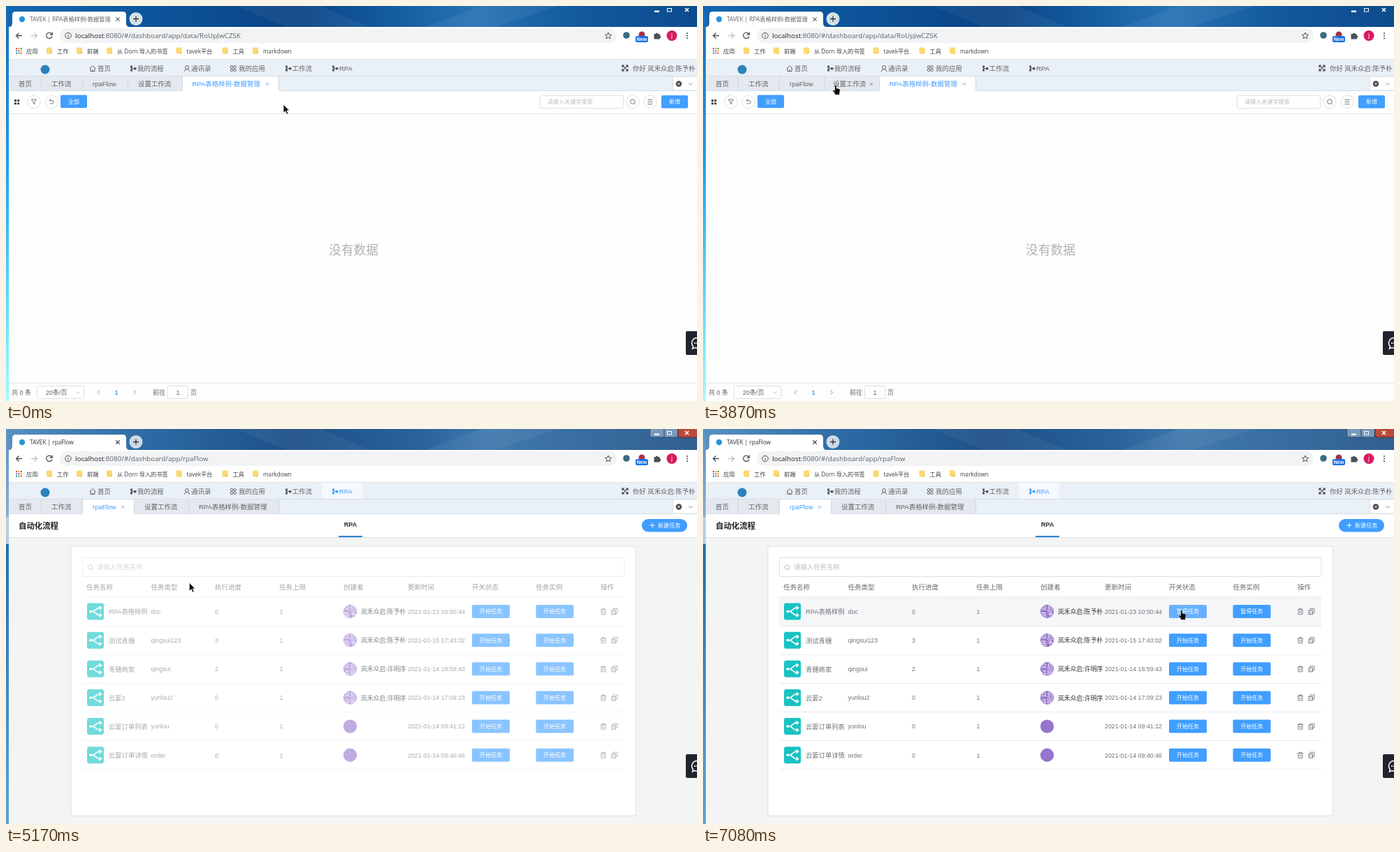
Recreate the animation shown at these times as an HTML page. Size 989x566 px, loop 8000 ms.

```html
<!DOCTYPE html>
<html lang="zh-CN">
<head>
<meta charset="utf-8">
<title>Task console</title>
<style>
html, body { margin: 0; width: 100%; height: 100%; overflow: hidden; background: #fff; }
svg { display: block; font-family: "Liberation Sans", "Noto Sans CJK SC", sans-serif; }
.ui { font-family: "Open Sans", "Noto Sans CJK SC", sans-serif; }
.b { font-weight: bold; }
.mid { text-anchor: middle; }
</style>
</head>
<body>
<svg width="989" height="566" viewBox="0 0 989 566">
  <defs>
    <linearGradient id="sky">
      <stop offset="0" stop-color="#1567b0"/><stop offset=".2" stop-color="#0d559c"/>
      <stop offset=".42" stop-color="#0b4384"/><stop offset=".55" stop-color="#135a9f"/>
      <stop offset=".68" stop-color="#2873b4"/><stop offset=".82" stop-color="#135a9f"/>
      <stop offset="1" stop-color="#0d4b8d"/>
    </linearGradient>
    <linearGradient id="glass">
      <stop offset="0" stop-color="#5a90c0"/><stop offset=".2" stop-color="#2d6ba5"/>
      <stop offset=".42" stop-color="#1d4f87"/><stop offset=".6" stop-color="#2a639c"/>
      <stop offset=".7" stop-color="#4079ad"/><stop offset="1" stop-color="#315f90"/>
    </linearGradient>
    <linearGradient id="strip" x2="0" y2="1">
      <stop offset="0" stop-color="#1468b4"/><stop offset=".4" stop-color="#1f9df0"/>
      <stop offset=".75" stop-color="#5fdcfb"/><stop offset="1" stop-color="#a5fbfb"/>
    </linearGradient>
    <linearGradient id="strip2" x2="0" y2="1">
      <stop offset="0" stop-color="#5a90c0"/><stop offset=".22" stop-color="#86b0d2"/>
      <stop offset=".225" stop-color="#b8cfe2"/><stop offset=".29" stop-color="#b8cfe2"/>
      <stop offset=".292" stop-color="#1f6fae"/><stop offset="1" stop-color="#5ba3d3"/>
    </linearGradient>
    <clipPath id="disc"><circle r="9.7"/></clipPath>
  </defs>
  <g id="scene"></g>
  <rect id="mask" x="109" y="184" width="777" height="305" fill="#fff"/>
  <g id="cursor"></g>
</svg>
<script>
const $ = id => document.getElementById(id);
const BLUE = '#409eff', GREY = '#606266', LINE = '#dcdfe6';

// Drawing helpers: text is placed by its vertical centre
const T = (x, y, s, size = 9.45, fill = GREY, cls = '') =>
  `<text x="${x}" y="${y + size * .37}" font-size="${size}" fill="${fill}" class="${cls}">${s}</text>`;
const R = (x, y, w, h, fill, r = 0, stroke = 'none') =>
  `<rect x="${x}" y="${y}" width="${w}" height="${h}" rx="${r}" fill="${fill}" stroke="${stroke}"/>`;
const C = (x, y, r, fill, stroke = 'none') =>
  `<circle cx="${x}" cy="${y}" r="${r}" fill="${fill}" stroke="${stroke}"/>`;
const P = (d, stroke = GREY, w = 1, fill = 'none') =>
  `<path d="${d}" stroke="${stroke}" stroke-width="${w}" fill="${fill}"/>`;
const at = (x, y, s) => `<g transform="translate(${x} ${y})">${s}</g>`;
const cross = (x, y, r, c, w = 1) => P(`M${x-r} ${y-r}l${2*r} ${2*r}m0 ${-2*r}l${-2*r} ${2*r}`, c, w);
const button = (x, y, w, h, s, fill = BLUE, r = 2) =>
  R(x, y, w, h, fill, r) + T(x + w / 2, y + h / 2, s, 8.1, '#fff', 'mid');
const magnifier = (x, y, c) => C(x, y, 3.3, 'none', c) + P(`M${x+2.4} ${y+2.4}l1.4 1.4`, c);

const company = '岚禾众启', owner = company + ':陈予朴', partner = company + ':许明序';
const form = 'RPA表格样例', formTab = form + '-数据管理';
const rows = [
  [form, 'doc', 0, owner, '23 10:50:44'],
  ['测试青穗', 'qingsui123', 3, owner, '15 17:43:02'],
  ['青穗商家', 'qingsui', 2, partner, '14 18:59:43'],
  ['云篓2', 'yunlou2', 0, partner, '14 17:09:23'],
  ['云篓订单列表', 'yunlou', 0, '', '14 09:41:12'],
  ['云篓订单详情', 'order', 0, '', '14 09:40:46'],
];

function chrome(page, focus) {
  const ink = focus ? '#303236' : '#5f6368', tool = '#4d5156';
  let s = R(0, 0, 989, 32, focus ? 'url(#glass)' : 'url(#sky)')
    + P('M330 0L400 30H520L450 0ZM600 30L680 0H790L700 30Z', 'none', 0, '#ffffff0d')
    + R(0, 0, 4, 566, focus ? 'url(#strip2)' : 'url(#strip)');
  if (focus) s += R(921.5, -4, 40, 16, '#7899bb', 3, '#27496d') + R(962, -4, 30, 16, '#bb4a3c', 3, '#5c2a2c')
    + P('M942 0V12', '#27496d');
  s += R(928, 6.5, 7, 2.5, '#fff') + R(946.5, 3.5, 6, 4.5, 'none', 0, '#fff') + cross(974.5, 5.5, 2.5, '#fff', 1.6)
    + P('M4 30Q9 30 9 24V13Q9 8 14 8H167Q172 8 172 13V24Q172 30 177 30Z', 'none', 0, '#fff')
    + C(23, 19, 4.2, '#2795dc')
    + T(34, 19, 'TAVEK | ' + (page ? 'rpaFlow' : formTab), 8.25, ink, 'ui')
    + cross(160, 19, 2.7, ink, 1.2) + C(186, 18.5, 9.5, focus ? '#cddbe6' : '#d3e1e5') + P('M182 18.5h8m-4-4v8', '#303236', 1.3)
    + R(4, 30, 985, 47, '#fff') + R(77, 32, 797, 21, '#f1f3f4', 10.5)
    + P('M23 42.5H14.5M18.5 38.5l-4 4 4 4', tool, 1.3) + P('M36 42.5H44.5M40.5 38.5l4 4-4 4', '#c0c2c5', 1.3)
    + P('M65.5 40A4.2 4.2 0 1 0 66 43.5M66.3 37.5V41H62.8', tool, 1.3)
    + C(89, 42.5, 4.2, 'none', tool) + P('M89 41.8v3m0-5v1', tool)
    + T(99, 42.3, `<tspan fill="#202124">localhost</tspan>:8080/#/dashboard/app/${page ? 'rpaFlow' : 'data/RoUpJwCZSK'}`, 9.83, '#5f6368', 'ui')
    + P('M862 38l1.3 3 3.2.3-2.4 2.2.7 3.2-2.8-1.7-2.8 1.7.7-3.2-2.4-2.2 3.2-.3Z', tool)
    + C(888, 42, 4.8, '#3b6b80') + C(910, 41, 4.5, '#a93242') + R(901, 43, 18, 9, '#1a73e8', 2)
    + T(910, 47.3, 'New', 7, '#fff', 'mid b')
    + P('M927.5 40h2.5a1.6 1.6 0 1 1 3.2 0h2.6v2.6a1.6 1.6 0 1 1 0 3.2v1.7h-8.3Z', 'none', 0, tool)
    + C(953, 42.5, 7.5, '#d81b60') + T(953, 42, 'j', 9, '#fff', 'mid');
  for (let i = 0; i < 3; i++) s += C(975, 39 + i * 3.5, 1.1, tool);
  for (let i = 0; i < 9; i++)
    s += R(14 + i % 3 * 3.3, 60 + (i / 3 | 0) * 3.3, 2, 2, ['#db4437', '#4285f4', '#0f9d58', '#f4a400'][i * 3 % 4]);
  s += T(29, 64.5, '应用', 8.3, '#3c4043', 'ui');
  [[58, '工作'], [101, '前端'], [144, '从 Dorn 导入的书签'], [243.5, 'tavek平台'], [309.5, '工具'], [353, 'markdown']]
    .forEach(([x, label]) => s += R(x, 59.5, 8, 9, '#fbd871', 1) + P(`M${x+5} 68.5l3-3`, '#dfb64c')
      + T(x + 15, 64.5, label, 8.2, '#3c4043', 'ui'));
  return s + P('M4 76.5H989', '#dfe3e7');
}

const flow = c => R(0, -4, 3, 3, c) + R(0, 1, 3, 3, c) + R(5, -1.5, 3.4, 3.4, c) + P('M1.5-3V3M2 0H6', c);
function nav(page) {
  let s = R(4, 77, 985, 44, '#e9f0f6') + C(56, 91, 6.5, '#2b82bd');
  if (page) s += R(452, 77, 58, 24, '#f5f8fc');
  const house = P('M0 0L4-4 8 0M1-1V4H7V-1M4 4V1.5');
  const person = C(4, -1.5, 2.5, 'none', GREY) + P('M0 4.5Q1 1 4 1T8 4.5');
  const cluster = [[2, -2.2], [6.5, -2.2], [2, 2.2], [6.5, 2.2]].map(([x, y]) => C(x, y, 1.8, 'none', GREY)).join('');
  [[120, 131, '首页', house], [178, 188, '我的流程', flow('#55595f')], [255, 265, '通讯录', person],
   [321, 333, '我的应用', cluster], [400, 409.5, '工作流', flow('#55595f')],
   [467, 477, 'RPA', flow(page ? BLUE : '#55595f')]].forEach(([x, tx, label, icon]) =>
    s += at(x, 89.5, icon) + T(tx, 89.5, label, 9.45, page && x == 467 ? BLUE : GREY));
  return s + P('M882 85l8 8m0-8l-8 8M882 88v-3h3M887 85h3v3M890 90v3h-3M885 93h-3v-3', '#44484e', 1.2)
    + T(897, 89.2, '你好 ' + owner, 9.4);
}

const tabStops = page => page ? [4, 51, 110, 184, 262, 391] : [4, 51, 110, 175, 253, 391];
function tabs(page, hover) {
  const stops = tabStops(page), active = page ? 2 : 4;
  let s = P('M4 100.5H989M4 121.5H989', '#d5dfe8');
  ['首页', '工作流', 'rpaFlow', '设置工作流', formTab].forEach((label, i) => {
    const x = stops[i], w = stops[i + 1] - x, on = i == active;
    s += R(x, 101, w, on ? 21 : 20, on ? '#fff' : '#e4e9ef') + P(`M${x+w-.5} 101v20`, '#cfd7df')
      + T(x + (i == 4 && !page ? 13.5 : 14) - (i == hover ? 3 : 0), 111.3, label, 9.45, on ? BLUE : GREY);
    if (on || i == hover) s += cross(x + w - 17 + (i == hover && !on ? 5 : 0), 111.8, 2, on ? '#79b5f5' : '#85898f', .9);
  });
  return s + R(954.5, 101, 35, 20, '#fff', 0, LINE) + C(963, 111.5, 4.2, '#45484d') + cross(963, 111.5, 1.6, '#fff')
    + P('M977 110.3l2.8 2.7 2.8-2.7', '#909399');
}

function emptyPage() {
  let s = R(4, 122, 985, 444, '#fdfdfd') + R(4, 122, 985, 32, '#fff') + P('M4 154.5H989M4 540.5H989', '#e1e4e8');
  for (let i = 0; i < 4; i++) s += R(12 + i % 2 * 4.2, 134 + (i >> 1) * 4.2, 3, 3, '#43474d');
  [40, 65, 897, 922].forEach(x => s += C(x, 137.3, 9.2, '#fff', LINE));
  s += P('M36.5 134h7l-2.7 3.5v3.2l-1.6-1v-2.2Z', '#777') + P('M62.5 135.2h3a2.4 2.4 0 1 1 0 4.8h-2.8M64 133.5l-1.8 1.7 1.8 1.7', '#777')
    + button(78, 127.5, 38, 18.5, '全部') + R(764.5, 128.5, 119, 18, '#fff', 2, LINE)
    + T(775, 137.3, '请输入关键字搜索', 8.1, '#b9bdc5') + magnifier(897, 137, '#777')
    + P('M918.5 134.5h7m-7 3h7m-7 3h7', '#777') + button(938, 128, 38, 18.5, '新增')
    + T(497.5, 349, '没有数据', 17.7, '#b4b1ad', 'mid')
    + T(8, 553.5, '共 0 条', 9) + R(44.5, 544.5, 67, 18, '#fff', 2, LINE) + T(57, 553.5, '20条/页', 9)
    + P('M100.5 552.5l2.5 2.5 2.5-2.5', '#c0c4cc') + P('M134 550.5l-3 3 3 3', '#909399') + T(158, 553.5, '1', 9.2, BLUE, 'mid b')
    + P('M182.5 550.5l3 3-3 3', '#909399') + T(210, 553.5, '前往', 9) + R(231.5, 544.5, 29, 18, '#fff', 2, LINE)
    + T(246, 553.5, '1', 9, GREY, 'mid') + T(264, 553.5, '页', 9);
  return s;
}

const shareIcon = P('M3 12H9L16 6.8H20M9 12L16 17.2H20M17.5 4.5l3 2.3-3 2.3M17.5 14.9l3 2.3-3 2.3', '#fff', 1.6)
  + C(5.5, 12, 1.9, '#fff');
function taskPage(loaded, hover, running, tone) {
  let s = R(4, 122, 985, 444, '#f3f4f4') + R(4, 122, 985, 33, '#fff') + P('M4 155.5H989', '#dfe2e6')
    + T(18, 139, '自动化流程', 11.4, '#1f2226', 'b') + T(493, 137, 'RPA', 9.2, '#303133', 'mid b') + R(476, 153, 34, 2.2, '#2f86d2')
    + R(910, 129, 65, 18.5, BLUE, 9.2) + P('M921.5 138h7m-3.5-3.5v7', '#fff') + T(933, 138.2, '新建任务', 8.1, '#fff')
    + R(91.5, 167.5, 811, 388, '#e9ebed', 3) + R(93, 168.5, 808.5, 385.5, '#fff', 2, '#e2e5ea')
    + R(109.5, 184.5, 775.5, 27, '#fff', 2, LINE) + magnifier(120.5, 198, '#b4b8c0') + T(130, 198, '请输入任务名称', 9.4, '#b9bdc5');
  const cols = [115, 207.5, 299, 391, 483, 575, 667, 758.5, 851];
  ['任务名称', '任务类型', '执行进度', '任务上限', '创建者', '更新时间', '开关状态', '任务实例', '操作']
    .forEach((h, i) => s += T(cols[i], 226.5, h, 9.5, '#65686e'));
  s += P('M109 240.5H885', '#e8ebf1');
  if (loaded) rows.forEach(([name, type, done, user, date], i) => {
    const y = 261.5 + i * 41.15, label = running && !i ? '暂停任务' : '开始任务';
    if (i == hover) s += R(109, y - 20.5, 776, 41, '#f5f6f7');
    s += P(`M109 ${Math.round(y + 20.2) + .5}H885`, '#e8ebf1') + R(116, y - 12, 24, 24, '#17c3c3', 3) + at(116, y - 12, shareIcon)
      + T(147, y + .5, name, 9.3, '#707379') + T(207.5, y, type, 8.8, '#707379') + T(299, y, done, 8.8, '#707379')
      + T(391.5, y, 1, 8.8, '#707379') + C(492.5, y, 9.7, '#9575cd');
    if (user) s += at(492.5, y, `<g clip-path="url(#disc)">${T(0, -4.5, user.slice(2, 4), 8.8, '#fff', 'mid')
      + T(0, 5.5, user.slice(5, 7), 8.8, '#fff', 'mid')}</g>`) + T(508, y + .3, user, 8.85, '#303236');
    s += T(575, y, '2021-01-' + date, 8.83, '#707379')
      + button(667, y - 9.5, 54, 19, label, i ? BLUE : tone) + button(758.5, y - 9.5, 54, 19, label)
      + at(855, y, P('M-4-2.5H4M-1.5-2.5V-4H1.5V-2.5M-3-2.5V4H3V-2.5M-1-.5V2M1-.5V2', '#74777c', .9))
      + at(871, y, R(-4, -1.5, 5.5, 5.5, 'none', 0, '#74777c') + P('M-2-1.5V-4H4V2H1.5M-2.5 1.3H0', '#74777c', .9));
  });
  return s;
}

const chat = R(973, 466, 18, 34, '#23232f', 2)
  + P('M989 475.5a7.5 7.5 0 0 0-5.5 12.5l-1 3 3.5-1.5 3 .7', '#fff', 1.5) + C(986, 483, 1.1, '#fff') + C(989, 483, 1.1, '#fff');

const arrow = P('M0 0V12.3L2.9 9.7 4.9 14.2 7 13.2 5 8.9H8.6Z', '#fff', .8, '#0b0b0b');
const hand = P('M-1.4 1Q0-1 1.2 1V5Q2.5 3.8 3.3 5.2 4.4 4.3 5 5.8 6.6 5.2 6.4 7.2L5.6 11.5V14H-1.2V12.2L-4 8.7Q-4.7 6.7-3 7L-1.4 8.3Z', '#fff', .6, '#0b0b0b');

// Pointer route: time, x, y
const route = [[0, 397, 141], [690, 397, 141], [800, 404, 165], [950, 385, 160], [1150, 312, 118], [1230, 308.5, 115.5],
  [1300, 308, 117], [1460, 340, 205], [1520, 370, 235], [1850, 555, 378], [2000, 470, 340], [2210, 130, 205],
  [2320, 134, 167], [2610, 194, 140], [2780, 190, 138], [2870, 174, 130], [3050, 100, 113], [3330, 338, 122],
  [3560, 322, 116], [3640, 300, 114], [3940, 157, 113], [4400, 152, 117], [4800, 152, 117], [5170, 262, 220],
  [5260, 284, 218], [5450, 302, 201], [5980, 420, 190], [6070, 510, 205], [6220, 672, 252.5], [6610, 685, 259.5], [8000, 685, 259.5]];
function pointer(t) {
  const i = route.findIndex(k => k[0] > t), [t0, x0, y0] = route[i - 1], [t1, x1, y1] = route[i];
  const p = (t - t0) / (t1 - t0);
  return [x0 + (x1 - x0) * p, y0 + (y1 - y0) * p];
}

let lastKey, lastShape;
function draw(now) {
  const t = now % 8000, [x, y] = pointer(t);
  const focus = t >= 4100, page = t >= 4700 ? 1 : 0, loaded = t >= 4950, running = t >= 7080;
  const onTabs = y >= 101 && y <= 121.5 && x < 391;
  const tab = onTabs && !page ? tabStops(0).findIndex(e => e > x) - 1 : -1;
  const hoverTab = tab > 0 && tab < 4 ? tab : -1;
  const row = page && y > 241 && x > 109 && x < 885 ? Math.floor((y - 241) / 41.15) : -1;
  const onButton = page && x >= 667 && x <= 721 && y >= 252 && y <= 271;
  const tone = t >= 7000 && t < 7080 ? '#3a8ee6' : onButton && t >= 6300 ? '#66b1ff' : BLUE;

  const key = [focus, page, loaded, running, hoverTab, row, tone].join();
  if (key !== lastKey) {
    $('scene').innerHTML = chrome(page, focus) + nav(page)
      + (page ? taskPage(loaded, row, running, tone) : emptyPage()) + tabs(page, hoverTab) + chat;
    lastKey = key;
  }
  $('mask').setAttribute('opacity', page ? .9 * Math.max(0, Math.min(1, (5300 - t) / 300)) : 0);

  const shape = onTabs || onButton ? hand : arrow;
  if (shape !== lastShape) $('cursor').innerHTML = lastShape = shape;
  $('cursor').setAttribute('transform', `translate(${x} ${y})`);
}

const start = performance.now();
function tick() {
  draw(performance.now() - start);
  requestAnimationFrame(tick);
}
tick();
</script>
</body>
</html>
```
